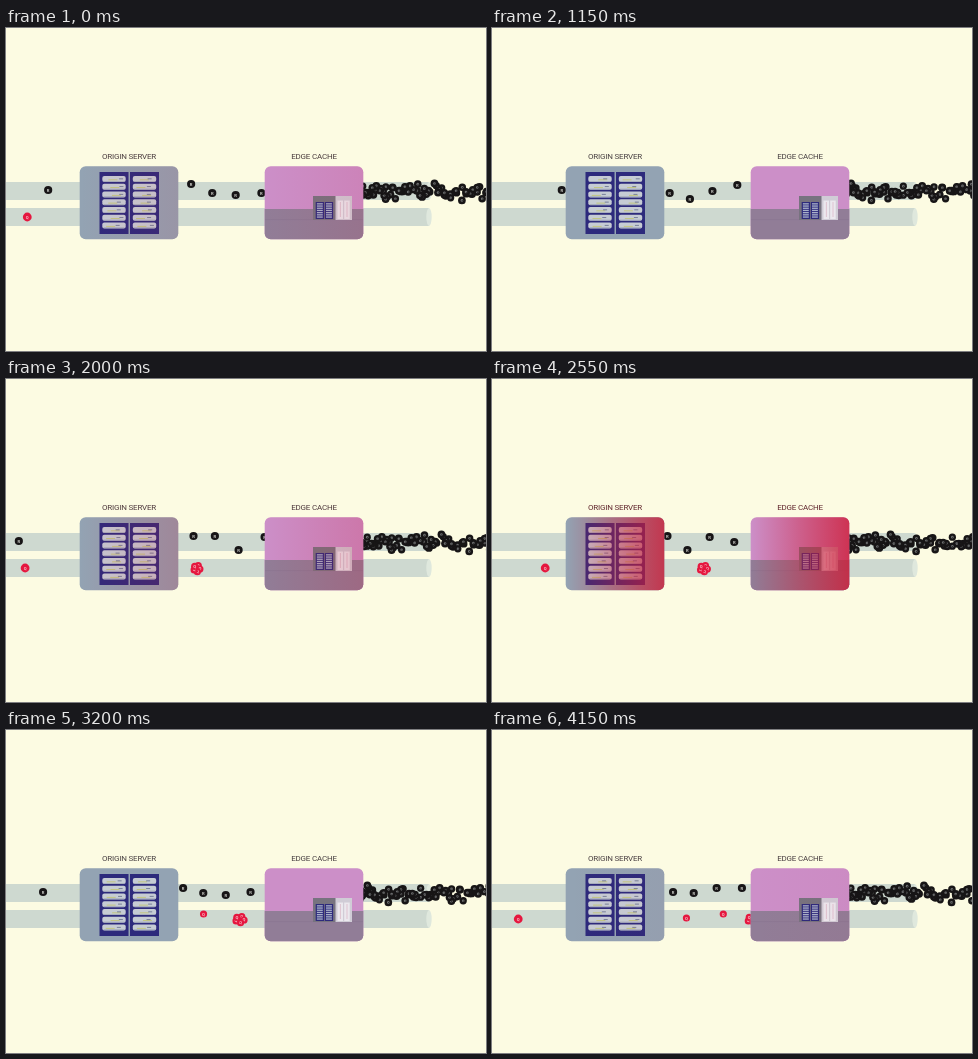
These frames come from a looping animation (480 px wide and 323 px high, 4200 ms). An HTML page with a canvas:

```html
<!DOCTYPE html>
<html lang="en">
<head>
<meta charset="utf-8">
<title>Origin server and edge cache</title>
<style>
html, body { margin: 0; width: 100%; height: 100%; overflow: hidden; background: #fcfbe2; }
canvas { display: block; width: 480px; height: 323px; }
</style>
</head>
<body>
<canvas id="stage"></canvas>
<script>
const W = 480, H = 323, LOOP = 4200, STEP = 50;
const BLACK = '#171516', RED = '#e5173f';
const HEIGHTS = [156, 165, 167, 165, 171, 163, 157, 157, 171, 158, 163, 165, 162, 163, 158, 158];

const canvas = document.getElementById('stage');
const ctx = canvas.getContext('2d');
const scale = window.devicePixelRatio || 1;
canvas.width = W * scale;
canvas.height = H * scale;

function random(seed) {
  return () => {
    seed = (seed * 16807) % 2147483647;
    return seed / 2147483647;
  };
}

const rnd = random(4711);
const CROWD = 70;
const crowd = Array.from({ length: CROWD }, (_, i) => ({
  phase: (i + rnd() * 2) / CROWD,
  y: 163.5 + (rnd() + rnd() - 1) * 10,
  r: 3.6 + rnd() * 0.4
}));

function rect(x, y, w, h, color) {
  ctx.fillStyle = color;
  ctx.fillRect(x, y, w, h);
}

function round(x, y, w, h, r, color) {
  ctx.fillStyle = color;
  ctx.beginPath();
  ctx.roundRect(x, y, w, h, r);
  ctx.fill();
}

function dot(x, y, r, color) {
  ctx.fillStyle = color;
  ctx.beginPath();
  ctx.arc(x, y, r, 0, Math.PI * 2);
  ctx.fill();
}

function text(str, x, y, font, color) {
  ctx.font = font;
  ctx.fillStyle = color;
  ctx.textAlign = 'center';
  ctx.fillText(str, x, y);
}

function drawBall(x, y, r, color, mark, ink) {
  dot(x, y, r, color);
  text(mark, x, y + 1.5, 'bold 4.2px Roboto, sans-serif', ink);
}

const request = (x, y) => drawBall(x, y, 4.1, BLACK, 'R', '#cfcfca');
const reply = (x, y, r) => drawBall(x, y, r, RED, 'Q', '#f9c3cb');

// Calls move(age in seconds, index) for each ball released every `gap` ms and still under way.
function stream(t, first, gap, life, move) {
  for (let i = 0; first + i * gap <= t; i++) {
    const age = (t - first - i * gap) / 1000;
    if (age < life) move(age, i);
  }
}

function drawRequests(t) {
  stream(t, -1065, 340, 1.35, (u, i) => request(259 - 80 * u + 10 * u * u, HEIGHTS[i % HEIGHTS.length]));
  stream(t, -475, 1562, 1.2, u => request(74 - 67 * u, 162));
}

function drawReplies(t) {
  stream(t, -440, 2035, 1.4, u => reply(-6 + 62 * u, 189, 4.4));
  stream(t, 1545, 1030, 2.9, (u, i) => {
    const x = 172 + 43 * u - 3.4 * u * u;
    if (i) return reply(x, 180 + 4 * i, 3.6);
    // The first release is a cluster that slowly spreads.
    for (let k = 0; k < 5; k++) {
      const a = k * Math.PI * 0.4 - 1.1;
      const spread = 2.6 + u;
      reply(x + Math.cos(a) * spread, 189.5 + Math.sin(a) * 3.2, 3.6);
    }
  });
}

function drawCrowd(t) {
  for (const b of crowd) {
    const p = (b.phase + t / 2100) % 1;
    const x = 353 + 133 * Math.pow(1 - p, 1.2);
    dot(x, b.y, b.r, BLACK);
    dot(x, b.y, 1.3, '#6f7172');
    dot(x + 0.3, b.y + 0.2, 0.5, BLACK);
  }
}

function drawTube(y) {
  rect(0, y, 423, 18, '#ced9d0');
  ctx.fillStyle = '#dfe8dd';
  ctx.beginPath();
  ctx.ellipse(423, y + 9, 2.7, 9, 0, 0, Math.PI * 2);
  ctx.fill();
}

function drawRack(x, t) {
  rect(x, 144, 29, 62, '#2d2a7c');
  const blink = random(Math.floor(t / 100) * 37 + x * 11 + 1);
  blink();
  for (let i = 0; i < 7; i++) {
    const y = 148 + i * 7.75;
    round(x + 2.8, y, 23.4, 6, 2, '#c6ccd4');
    rect(x + 4, y + 5, 21, 0.6, '#959db0');
    const shift = blink() * 7;
    rect(x + 6 + shift, y + 3.4, 9, 0.9, '#c2c678');
    rect(x + 16 + blink() * 4, y + 2.4, 4, 0.9, '#6f7894');
  }
}

function drawOrigin(t) {
  round(73.7, 138.2, 98.6, 73, 6, '#93a3b3');
  drawRack(93.5, t);
  drawRack(124, t);
}

function drawMiniRack(x) {
  rect(x, 174, 8.3, 17, '#2d2a7c');
  for (let i = 0; i < 7; i++) rect(x + 1.2, 175.2 + i * 2.2, 5.9, 1.3, '#a9b1c9');
}

function drawCache() {
  round(258.7, 138.2, 98.6, 73, 6, '#cc8fc8');
  round(258.7, 181, 98.6, 30.2, [0, 0, 6, 6], '#917d97');
  rect(259, 191.5, 98, 0.6, '#887590');
  rect(307, 168, 23, 24, '#77737f');
  drawMiniRack(309.7);
  drawMiniRack(318.8);
  rect(329.5, 168, 16.5, 24, '#d0ccd6');
  for (const x of [331.5, 338.2]) {
    rect(x, 172.5, 5.5, 18.5, '#ebe8ee');
    rect(x + 2.4, 174, 0.8, 15, '#dcb9c8');
  }
}

function drawGlow(x, level) {
  const g = ctx.createLinearGradient(x, 0, x + 98, 0);
  for (const [stop, alpha] of [[0, 0], [0.5, 0.48], [1, 0.92]]) {
    g.addColorStop(stop, `rgba(206,28,54,${alpha * level})`);
  }
  round(x - 0.3, 138.2, 98.6, 73, 6, g);
}

function draw(t) {
  ctx.setTransform(scale, 0, 0, scale, 0, 0);
  rect(0, 0, W, H, '#fcfbe2');
  drawTube(154);
  drawTube(180);
  drawCrowd(t);
  drawRequests(t);
  drawReplies(t);
  drawOrigin(t);
  drawCache();

  const level = (1 - Math.cos((t - 110) / 1025 * Math.PI * 2)) / 2;
  drawGlow(74, level);
  drawGlow(259, level);

  const ink = `rgb(${72 + 28 * level},${64 - 30 * level},${66 - 24 * level})`;
  const font = '8px Roboto, "Open Sans", sans-serif';
  ctx.letterSpacing = '-0.2px';
  text('ORIGIN SERVER', 123, 131.3, font, ink);
  text('EDGE CACHE', 308, 131.3, font, ink);
  ctx.letterSpacing = '0px';
}

const start = performance.now();
function tick() {
  const t = (performance.now() - start) % LOOP;
  draw(Math.floor(t / STEP) * STEP);
  requestAnimationFrame(tick);
}
tick();
</script>
</body>
</html>
```
